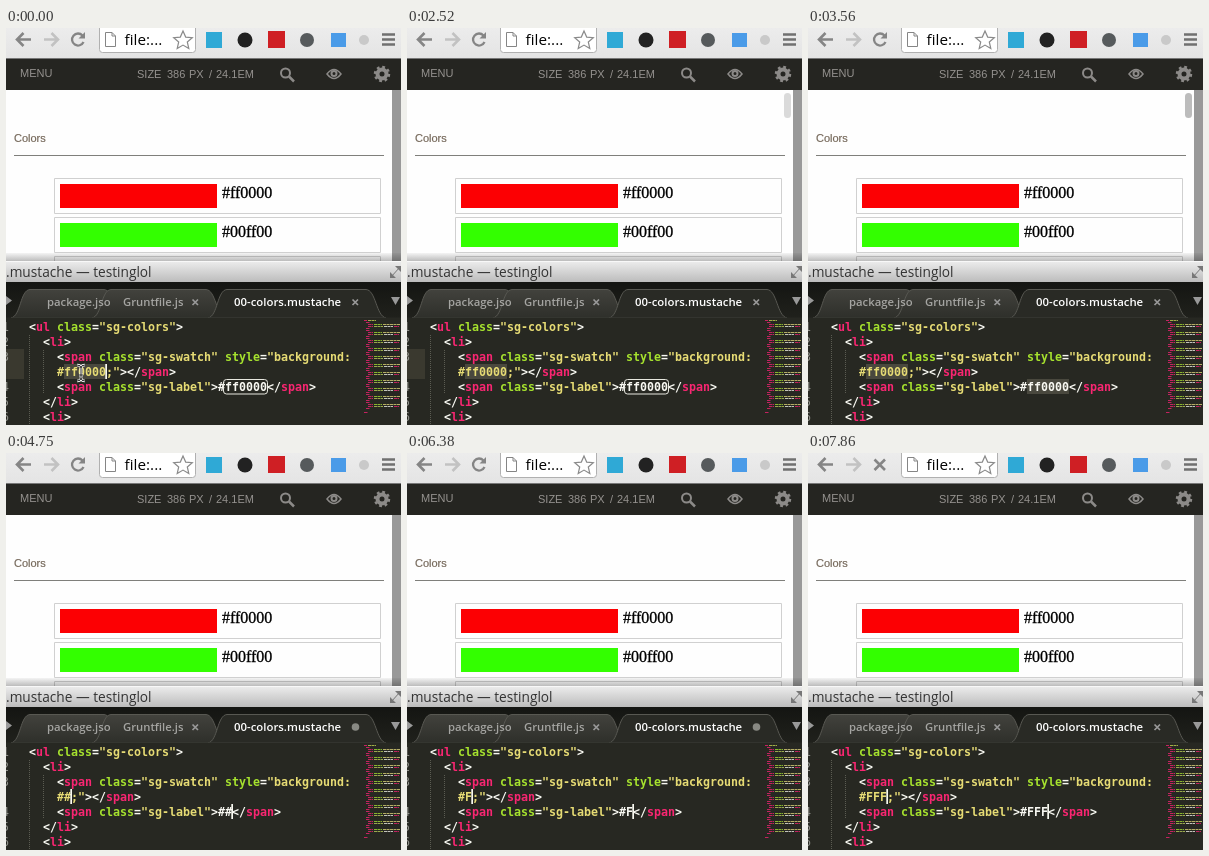
Write an HTML page that moves like this. It is 395 px wide and 397 px high and loops after 8 s.

```html
<!DOCTYPE html>
<html lang="en">
<head>
<meta charset="utf-8">
<style>
html, body { margin: 0; width: 100%; height: 100%; overflow: hidden; background: #272822; }
svg { display: block; }
text { white-space: pre; }
.ui { font-family: "Open Sans", sans-serif; font-size: 11.7px; }
.tabs { font-size: 11.3px; font-weight: 600; fill: #a5a5a2; }
.arial { font: 11px "Liberation Sans", Arial, sans-serif; fill: #95928f; }
.serif { font: 16px "Liberation Serif", Times, serif; stroke: #000; stroke-width: .3px; }
.code { font: bold 11.63px "DejaVu Sans Mono", monospace; fill: #f8f8f2; }
.tag { fill: #f92672; }
.attr { fill: #a6e22e; }
.str { fill: #e6db74; }
</style>
</head>
<body>
<svg width="395" height="397" viewBox="0 0 395 397">
  <defs>
    <linearGradient id="bar" x2="0" y2="1"><stop stop-color="#ececec"/><stop offset="1" stop-color="#e4e4e4"/></linearGradient>
    <linearGradient id="shadow" x2="0" y2="1"><stop stop-color="#000" stop-opacity=".04"/><stop offset="1" stop-color="#000" stop-opacity=".26"/></linearGradient>
    <linearGradient id="title" x2="0" y2="1"><stop stop-color="#ededed"/><stop offset="1" stop-color="#bcbcbc"/></linearGradient>
    <linearGradient id="tabs" x2="0" y2="1"><stop stop-color="#141512"/><stop offset="1" stop-color="#20211c"/></linearGradient>
    <linearGradient id="tab" x2="0" y2="1"><stop stop-color="#42423d"/><stop offset="1" stop-color="#2e2f2a"/></linearGradient>
    <clipPath id="tabClip"><path d="M0 256H104V290H0z"/></clipPath>
  </defs>

  <!-- browser toolbar -->
  <rect width="395" height="31" fill="url(#bar)"/>
  <g fill="none" stroke-width="2.600">
    <path d="M25 11.500H11.500M17.500 5L11 11.500L17.500 18" stroke="#858585"/>
    <path d="M38 11.500H51.500M45.500 5L52 11.500L45.500 18" stroke="#c2c2c2"/>
    <g id="reload"><path d="M76.500 7.500A6 6 0 1 0 77.500 14" stroke="#858585" stroke-width="2.300"/><path d="M79 4V10.500H72.500z" fill="#858585"/></g>
    <path id="stop" d="M66.500 6.500L77 17M77 6.500L66.500 17" stroke="#858585"/>
  </g>
  <rect x="93.500" y="-5" width="96" height="29.500" rx="3" fill="#fff" stroke="#b0b0b0"/>
  <path d="M99.500 4.500H106L109.500 8V18.500H99.500zM106 4.500V8H109.500" fill="#fff" stroke="#858585"/>
  <text class="ui" x="118.500" y="17" style="font-size:15.300px">file:...</text>
  <path d="M177 3L179.700 9.100L186.300 9.700L181.300 14L182.800 20.500L177 17.100L171.200 20.500L172.700 14L167.700 9.700L174.300 9.100z" fill="#fff" stroke="#8a8a8a" stroke-width="1.200"/>
  <rect x="200" y="4" width="16" height="16" fill="#2fa9d6"/>
  <circle cx="239" cy="12" r="7.500" fill="#222"/>
  <rect x="262" y="3" width="17" height="17" fill="#cf1f24"/>
  <circle cx="301" cy="12" r="7" fill="#565a5c"/>
  <rect x="325" y="5" width="15" height="14" fill="#4a9be8"/>
  <circle cx="358" cy="12" r="5" fill="#c9c9c9"/>
  <path d="M376 6.500H389M376 11.500H389M376 16.500H389" stroke="#707070" stroke-width="2.300"/>

  <!-- page -->
  <rect y="30" width="395" height="1" fill="#777"/>
  <rect y="31" width="395" height="31" fill="#252521"/>
  <g class="arial">
    <text x="14" y="49">MENU</text><text x="131" y="50">SIZE</text><text x="161" y="50">386</text>
    <text x="183" y="50">PX</text><text x="203" y="50">/</text><text x="210" y="50">24.1EM</text>
  </g>
  <g fill="none" stroke="#8c8a88" stroke-width="2">
    <circle cx="279.500" cy="45" r="4.500"/><path d="M283 48.500L288 53.500" stroke-width="2.500"/>
    <path d="M321 46Q328 37 335 46Q328 55 321 46z" stroke-width="1.500"/><circle cx="328" cy="45.500" r="2.500"/>
    <circle cx="376" cy="46" r="4.500" stroke-width="4"/><circle cx="376" cy="46" r="7" stroke-width="2.500" stroke-dasharray="2.750"/>
  </g>
  <rect y="62" width="386" height="171" fill="#fefefe"/>
  <rect x="386" y="62" width="9" height="171" fill="#999"/>
  <rect id="thumb" x="377" y="65" width="7" height="25" rx="3.500" fill="#bcbcbc"/>
  <text class="arial" x="8" y="114" style="fill:#75685a;stroke:#75685a;stroke-width:.2px">Colors</text>
  <path d="M8 127.500H378" stroke="#7f7f7b"/>
  <path d="M48.500 150.500H374.500V185.500H48.500zM48.500 189.500H374.500V224.500H48.500zM48.500 240V228.500H374.500V240" fill="none" stroke="#d0d0d0"/>
  <rect x="54" y="156" width="157" height="24" fill="#fc0003"/>
  <rect x="54" y="195" width="157" height="24" fill="#3f0"/>
  <text class="serif" x="216" y="170">#ff0000</text>
  <text class="serif" x="216" y="209">#00ff00</text>

  <!-- editor -->
  <rect y="225" width="395" height="8" fill="url(#shadow)"/>
  <rect y="233" width="395" height="21" fill="url(#title)"/>
  <rect y="233" width="395" height="1" fill="#f8f8f8"/>
  <text class="ui" x="0" y="249" fill="#333" style="font-size:13.700px">.mustache — testinglol</text>
  <path d="M389 238H395V244zM384 244V250H390z" fill="#777"/>
  <path d="M385 249L394 239" stroke="#777"/>
  <rect y="254" width="395" height="36" fill="url(#tabs)"/>
  <g fill="url(#tab)" stroke="#585852">
    <path d="M5 290C15 288 14 262 24 261.500H98C108 262 108 288 118 290z"/>
    <path d="M86 290C96 288 95 262 105 261.500H200C210 262 210 288 220 290z"/>
    <path d="M202 290C212 288 211 262 221 261.500H360C370 262 370 288 380 290z" fill="#292a25"/>
  </g>
  <rect y="289.500" width="395" height="108" fill="#272822"/>
  <path d="M0 268L6 272.500L0 277zM385 269H394L389.500 277z" fill="#999"/>
  <g class="ui tabs">
    <text x="41" y="278" clip-path="url(#tabClip)">package.json</text>
    <text x="117" y="278">Gruntfile.js</text>
    <text x="228" y="278" fill="#fff" style="font-size:11.400px">00-colors.mustache</text>
  </g>
  <path d="M186.500 271.500L192 277M192 271.500L186.500 277" stroke="#999" stroke-width="1.700"/>
  <path id="close" d="M346.500 271.500L352 277M352 271.500L346.500 277" stroke="#999" stroke-width="1.700"/>
  <circle id="dirty" cx="349.500" cy="274" r="3.800" fill="#888983"/>
  <rect id="gutter" y="321" width="18" height="30" fill="#3a392f"/>
  <path d="M23.500 307V397M37.500 322V366" stroke="#5b5c52" stroke-dasharray="1 1"/>
  <rect id="selA" x="58" y="336" width="42" height="15" fill="#49483e"/>
  <rect id="selB" x="219" y="351" width="42" height="15" fill="#49483e"/>
  <g class="code" id="code"></g>
  <rect id="match" x="217.500" y="351.500" width="44" height="14.500" rx="3" fill="none" stroke="#e8e8e0"/>
  <rect id="caretA" y="336" width="1.700" height="15" fill="#f8f8f0"/>
  <rect id="caretB" y="351" width="1.700" height="15" fill="#f8f8f0"/>
  <g id="minimap"></g>
  <g id="mouse" fill="none">
    <path d="M-4 -8Q0 -8 0 -5Q0 -8 4 -8M0 -5V5M-4 8Q0 8 0 5Q0 8 4 8M-2 2H2" stroke="#fff" stroke-width="2.600"/>
    <path d="M-4 -8Q0 -8 0 -5Q0 -8 4 -8M0 -5V5M-4 8Q0 8 0 5Q0 8 4 8M-2 2H2" stroke="#222"/>
  </g>
</svg>
<script>
const $ = id => document.getElementById(id);
const LOOP = 8000, CHAR = 7, LINE = 15, FIRST = 303;

const span = (kind, text) => `<tspan class="${kind}">${text}</tspan>`;
const open = (name, attrs = '', end = '&gt;') => '&lt;' + span('tag', name) + attrs + end;
const close = name => '&lt;/' + span('tag', name) + '&gt;';
const attr = (name, value) => ' ' + span('attr', name) + '=' + span('str', value);

// [indent, line number, markup]; the fourth row is a soft wrap
const lines = [
  [0, '1', open('ul', attr('class', '"sg-colors"'))],
  [2, '2', open('li')],
  [4, '3', open('span', attr('class', '"sg-swatch"') + attr('style', '"background:'), '')],
  [4, '', span('str', '#<tspan id="hexA"></tspan>;"') + '&gt;' + close('span')],
  [4, '4', open('span', attr('class', '"sg-label"')) + '#<tspan id="hexB"></tspan>' + close('span')],
  [2, '5', close('li')],
  [2, '6', open('li')]
];
$('code').innerHTML = lines.map(([indent, number, markup], i) => {
  const y = FIRST + i * LINE;
  return `<text x="-4" y="${y}" fill="#8f908a" font-weight="400">${number}</text>
    <text x="${23 + indent * CHAR}" y="${y}">${markup}</text>`;
}).join('');

const dash = (x, y, w, color) => `<path d="M${x} ${y}h${w}" stroke="${color}" stroke-dasharray="3 .5"/>`;
let map = dash(358, 292.500, 3, '#c42260') + dash(362, 292.500, 8, '#a3ad48');
for (let y = 294.500; y < 382; y += 8) {
  map += dash(360, y, 4, '#c42260') +
    dash(362, y + 2, 5, '#c42260') + dash(368, y + 2, 8, '#88b82c') + dash(377, y + 2, 17, '#b5ad64') +
    dash(362, y + 4, 5, '#c42260') + dash(368, y + 4, 9, '#9aab4c') + dash(378, y + 4, 9, '#c4c4bc') + dash(388, y + 4, 5, '#c42260') +
    dash(360, y + 6, 4, '#c42260');
}
$('minimap').innerHTML = map + dash(358, 384.500, 4, '#c42260');

// [start time, text after the fixed "#"]
const typing = [[0, 'ff0000'], [4600, '#'], [5050, '#F'], [5500, '#FF'], [5650, '#F'], [5790, '#'],
  [5940, ''], [6230, 'F'], [6530, 'FF'], [6680, 'FFF']];
const caretOn = [[-200, 230], [1080, 1530], [1980, 2380], [2870, 3270], [3700, 4150], [4600, 7070], [7500, 8200]];

const clamp = v => Math.max(0, Math.min(1, v));
const show = (id, v) => $(id).setAttribute('opacity', +v);
const within = (t, a, b) => t >= a && t < b;

function draw(t) {
  const hex = typing.filter(([start]) => t >= start).pop()[1];
  $('hexA').textContent = $('hexB').textContent = hex;

  const selecting = t < 4600, both = t >= 2820;
  show('selA', selecting);
  show('selB', selecting && both);
  show('match', !both);
  show('gutter', !both);

  const blink = Math.max(...caretOn.map(([a, b]) => clamp(Math.min((t - a) / 100 + .5, (b - t) / 100 + .5))));
  $('caretA').setAttribute('x', 57.300 + hex.length * CHAR);
  $('caretB').setAttribute('x', 218.300 + hex.length * CHAR);
  show('caretA', blink);
  show('caretB', both ? blink : 0);

  const dirty = within(t, 4600, 7420);
  show('dirty', dirty);
  show('close', !dirty);

  const loading = within(t, 1330, 2380) || t >= 7710;
  show('stop', loading);
  show('reload', !loading);
  show('thumb', clamp(Math.min((t - 2300) / 400, (4050 - t) / 400)));

  const move = clamp((t - 140) / 290);
  $('mouse').setAttribute('transform', `translate(${75 + 20 * move} ${345 + 67 * move})`);
  show('mouse', t < 430);
}

function tick() {
  draw(performance.now() % LOOP);
  requestAnimationFrame(tick);
}
tick();
</script>
</body>
</html>
```
